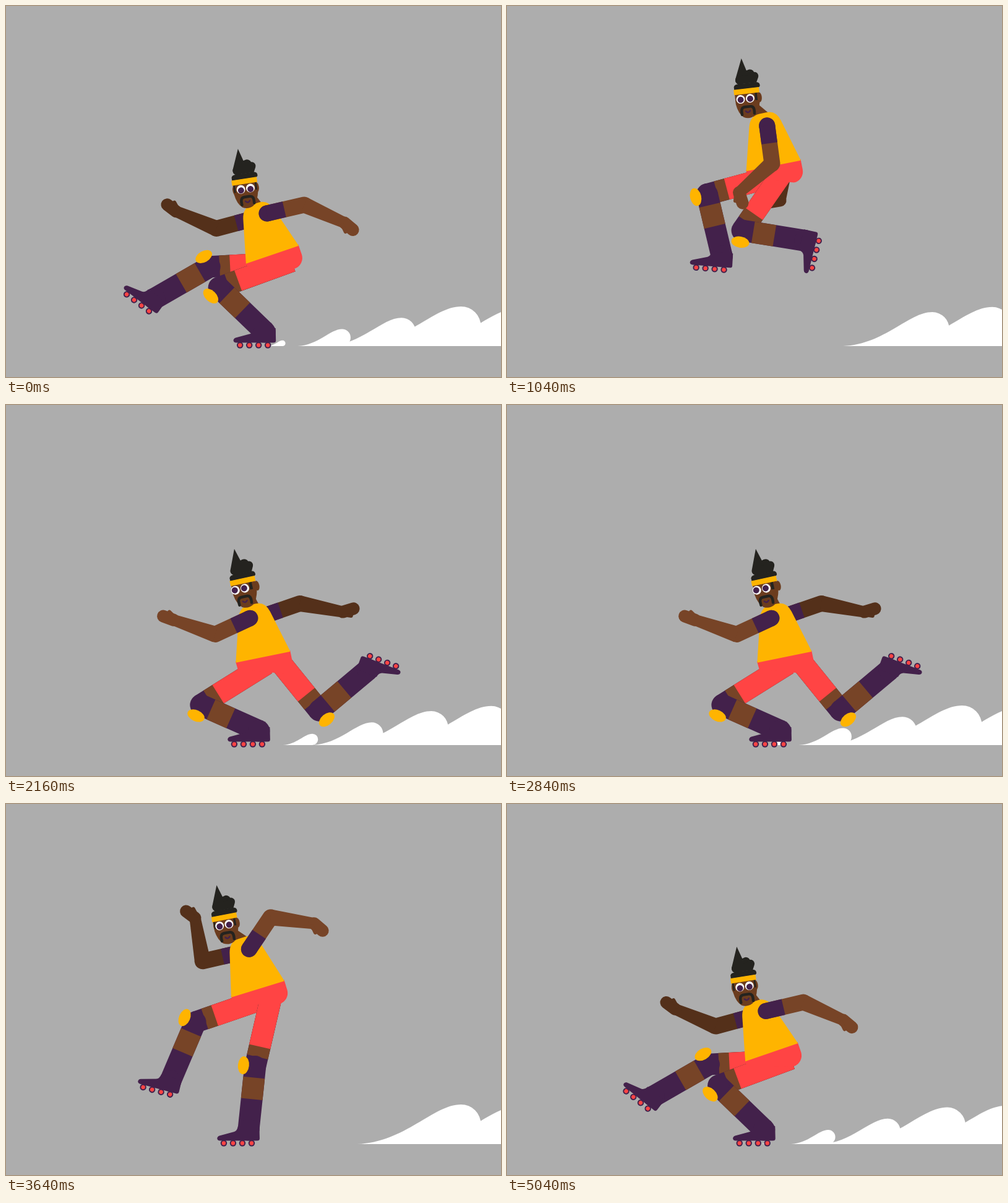
An HTML page with a canvas that plays this animation: 800 px wide and 600 px high, repeating every 5080 ms.

```html
<!DOCTYPE html>
<html lang="en">
<head>
<meta charset="utf-8">
<title>Roller skater</title>
<style>
  html, body { margin: 0; width: 100%; height: 100%; overflow: hidden; background: #adadad; }
  canvas { display: block; }
</style>
</head>
<body>
<canvas id="stage" width="800" height="600"></canvas>
<script>
const ctx = document.getElementById('stage').getContext('2d');
const LOOP = 5080, STEP = 40, GROUND = 550, ANKLE_Y = 527;
const THIGH = 125, SHIN = 103, UPPER = 62, FORE = 71;
const PURPLE = '#43214b', RED = '#ff4444', YELLOW = '#ffb400', BLACK = '#24231f';
const SKIN = '#774427', FACE = '#6b3c1e', SHADE = '#54301a', WHITE = '#fff';

// Arms: upper and fore angle. Legs: thigh, shin and foot angle. All in degrees.
const coast = {
  x: 430.5, tilt: -18.8, turn: 1,
  nearArm: [-13, 24], farArm: [165, 203], nearLeg: [160, 44, 0], farLeg: [177, 150, 37]
};
const crouch = {
  x: 467.5, tilt: -11, turn: 1,
  nearArm: [-3, 73], farArm: [136, 192], nearLeg: [170, 39, 0], farLeg: [182, 122, 14]
};
const stride = {
  x: 394, tilt: -11.6, turn: -1,
  nearArm: [162, 192], farArm: [-19, 11], nearLeg: [66, -28, -156], farLeg: [148, 34, 0]
};
const lowStride = {
  ...stride, x: 448.5, nearArm: [155, 199], nearLeg: [51, -40, -159], farLeg: [148, 24, 0]
};
const lift = {
  x: 407, tilt: -17.2, turn: 0.3,
  nearArm: [-56, 8], farArm: [167, 260], nearLeg: [103, 96, 0], farLeg: [161, 113, 15]
};
const kick = {
  x: 363, tilt: -22.6, turn: 1,
  nearArm: [-19, 35], farArm: [146, 204], nearLeg: [154, 39, 0], farLeg: [180, 142, 73]
};
const KEYS = [
  { at: 0, ...coast }, { at: 640, ...crouch }, { at: 1440, ...stride },
  { at: 1760, ...lowStride, x: 397 }, { at: 2840, ...lowStride },
  { at: 3640, ...lift }, { at: 4200, ...kick }
];
const JUMPS = [{ from: 690, to: 1150, height: 168 }, { from: 3200, to: 3640, height: 104 }];

const rad = deg => deg * Math.PI / 180;
const mix = (a, b, k) => a + (b - a) * k;
const polar = (p, deg, len) => [p[0] + Math.cos(rad(deg)) * len, p[1] + Math.sin(rad(deg)) * len];

// Cyclic monotone cubic through one value of the key poses
function curve(t, pick) {
  const n = KEYS.length, i = KEYS.findLastIndex(key => key.at <= t);
  const [p, a, b, q] = [-1, 0, 1, 2].map(d => {
    const turns = Math.floor((i + d) / n), key = KEYS[i + d - turns * n];
    return { at: key.at + turns * LOOP, v: pick(key) };
  });
  const slope = (u, w) => (w.v - u.v) / (w.at - u.at);
  const tangent = (u, w) => u * w > 0 ? 2 * u * w / (u + w) : 0;
  const d = slope(a, b), span = b.at - a.at, s = (t - a.at) / span, r = 1 - s;
  return a.v * (1 + 2 * s) * r * r + b.v * s * s * (3 - 2 * s)
    + span * s * r * (tangent(slope(p, a), d) * r - tangent(d, slope(b, q)) * s);
}

function fill(color, path) {
  ctx.fillStyle = color;
  ctx.fill(new Path2D(path));
}

function oval(x, y, rx, color, ry = rx, angle = 0) {
  ctx.fillStyle = color;
  ctx.beginPath();
  ctx.ellipse(x, y, rx, ry, angle, 0, 7);
  ctx.fill();
}

function stroke(color, width, path, cap = 'butt') {
  ctx.strokeStyle = color;
  ctx.lineWidth = width;
  ctx.lineCap = cap;
  ctx.stroke(new Path2D(path));
}

const bar = (a, b, width, color, cap) => stroke(color, width, `M${a} L${b}`, cap);

function within(p, deg, draw) {
  ctx.save();
  ctx.translate(...p);
  ctx.rotate(rad(deg));
  draw();
  ctx.restore();
}

// Puffs leave the skate at a steady beat while it touches the ground
function drawDust(t) {
  const beat = 160, cycle = 32 * beat;
  const clock = t < LOOP / 2 ? t : t + STEP;
  const newest = Math.floor((clock - 80) / beat) * beat + 80;
  for (let born = newest - 6 * beat; born <= newest; born += beat) {
    const at = (born + cycle) % cycle;
    if (JUMPS.some(jump => at > jump.from && at < jump.to)) continue;
    const age = clock - born, late = Math.max(0, age - 560) ** 2;
    const size = 0.1145 * Math.min(age, 560) - 0.00014 * late;
    ctx.save();
    ctx.translate(399 + 0.658 * age - 0.0007 * late, GROUND);
    ctx.scale(size, -size);
    fill(WHITE, 'M-3.12,0 C-1.9,.05 -1.2,1 -.5,1 A.5,.5 0 0 0 -.5,0Z');
    ctx.restore();
  }
}

function drawArm(shoulder, [upper, fore], hand, color) {
  const elbow = polar(shoulder, upper, UPPER), wrist = polar(elbow, fore, FORE);
  bar(shoulder, elbow, 26, color, 'round');
  bar(shoulder, polar(shoulder, upper, 1), 26, PURPLE, 'round');
  bar(shoulder, polar(shoulder, upper, 29), 26, PURPLE);
  within(elbow, fore, () => fill(color, `M0,-13 L${FORE},-9 V9 L0,13Z`));
  within(wrist, hand, () => {
    bar([0, 0], [18, 0], 20, color, 'round');
    bar([0, 5], [11, 10], 6, color, 'round');
  });
}

function drawFoot() {
  fill(PURPLE, 'M17.5,-6 L18,14 Q18,17.5 14,17.5 H-46 C-52,17.5 -52,11 -47,9.5 L-23,3 Q-18,1 -17,-6Z');
  for (let x = -40; x <= 5; x += 15) {
    oval(x, 21.5, 5.2, PURPLE);
    oval(x, 21.5, 3.2, RED);
  }
}

function drawLeg(hip, [thigh, shin, foot]) {
  const knee = polar(hip, thigh, THIGH), ankle = polar(knee, shin, SHIN);
  bar(hip, knee, 35, PURPLE);
  bar(hip, polar(hip, thigh, THIGH - 16), 35, SKIN);
  bar(hip, polar(hip, thigh, THIGH - 33), 35, RED);
  bar(knee, ankle, 35, PURPLE);
  bar(polar(knee, shin, 18), polar(knee, shin, 53), 35, SKIN);
  oval(...knee, 17.5, PURPLE);
  oval(...ankle, 17.5, PURPLE);
  within(ankle, foot, drawFoot);
  oval(...polar(knee, shin + 90, 19), 14.5, YELLOW, 9, rad(shin));
}

function drawHead(turn) {
  const shift = 3.5 * turn - 3.5;
  for (const side of [-1, 1]) oval(side * 17.5 + 1 - (turn - 1) * 1.5, -4, 4, FACE, 8);
  fill(FACE, 'M-19,-20 V3 Q-17,18 -9,25 Q0,30 9,25 Q17,18 20,3 V-20Z');
  if (turn > 0) bar([-17, -12], [-17, 0], 2.5, BLACK);
  bar([15 + 3 * turn, -12], [15 + 3 * turn, 0], 3.5 - turn, BLACK);

  for (const x of [-7, 8.5]) {
    oval(x + shift, -4, 7, WHITE);
    oval(x + shift + Math.min(0, turn), -3.3 + turn * 0.9, 5, PURPLE);
  }
  ctx.save();
  ctx.translate(shift / 2, 0);
  stroke(BLACK, 4.5, 'M-9,21 C-10,12 -8,9 -3,9 H5 C10,9 12,12 11,21', 'round');
  stroke(PURPLE, 2.5, 'M-2.5,16 Q1,20.5 4.5,16', 'round');
  ctx.restore();

  fill(BLACK, 'M-19,-20 V-25 Q-18,-29 -12,-29 H18 Q24,-28 23,-22 L21,-20Z');
  stroke(BLACK, 15, 'M-8,-35 L-3,-47 L-1,-40 L9,-43', 'round');
  stroke(BLACK, 13, 'M-9,-35 H14 L16,-39', 'round');
  fill(YELLOW, 'M-20,-20.5 H21 V-12 H-20Z');
}

function drawSkater(t) {
  const number = name => curve(t, key => key[name]);
  const angles = name => KEYS[0][name].map((_, i) => curve(t, key => key[name][i]));
  const [x, tilt, turn] = ['x', 'tilt', 'turn'].map(number);
  const [nearArm, farArm, nearLeg, farLeg] = ['nearArm', 'farArm', 'nearLeg', 'farLeg'].map(angles);
  const c = Math.cos(rad(tilt)), s = Math.sin(rad(tilt));
  const facing = (turn + 1) / 2, swing = Math.min(1, 1.6 * facing);
  const offset = (px, py) => [px * c - py * s, px * s + py * c];
  const nearHip = offset(mix(14, 26, facing), mix(-8, 20, facing));
  const farHip = offset(mix(3, 18, facing), mix(12, 20, facing));
  const reach = (hip, [thigh, shin]) => polar(polar(hip, thigh, THIGH), shin, SHIN)[1];

  // The lower foot rests on the ground unless a jump lifts it
  let y = ANKLE_Y - Math.max(reach(nearHip, nearLeg), reach(farHip, farLeg));
  for (const { from, to, height } of JUMPS) {
    const u = (t - from) / (to - from);
    if (u > 0 && u < 1) y -= height * 4 * u * (1 - u);
  }
  const place = ([dx, dy]) => [x + dx, y + dy];
  const onBody = (px, py) => place(offset(px, py));
  const head = onBody(-8 - 13 * (1 - turn * turn), -111);

  drawArm(onBody(mix(14, -10, swing), -65), farArm, mix(-17, 217, swing), SHADE);
  drawLeg(place(farHip), farLeg);
  drawLeg(place(nearHip), nearLeg);
  bar(polar(head, 60, 8), onBody(2, -78), 20, FACE);
  within([x, y], tilt, () => {
    fill(RED, 'M-45,-2 H45 V15 A18,18 0 0 1 27,33 L-44,11Z');
    fill(YELLOW, 'M-45,0 L-26,-70 Q-21,-87 -6,-87 H6 Q21,-87 26,-70 L45,0Z');
  });
  within(head, tilt + 4.7 + 5.3 * turn, () => drawHead(turn));
  drawArm(onBody(2.5 + 10.5 * turn, -66), nearArm, mix(200, 40, swing), SKIN);
}

const start = performance.now();

function render() {
  const t = Math.floor((performance.now() - start) % LOOP / STEP) * STEP;
  ctx.fillStyle = '#adadad';
  ctx.fillRect(0, 0, 800, 600);
  drawDust(t);
  drawSkater(t);
  requestAnimationFrame(render);
}
render();
</script>
</body>
</html>
```
